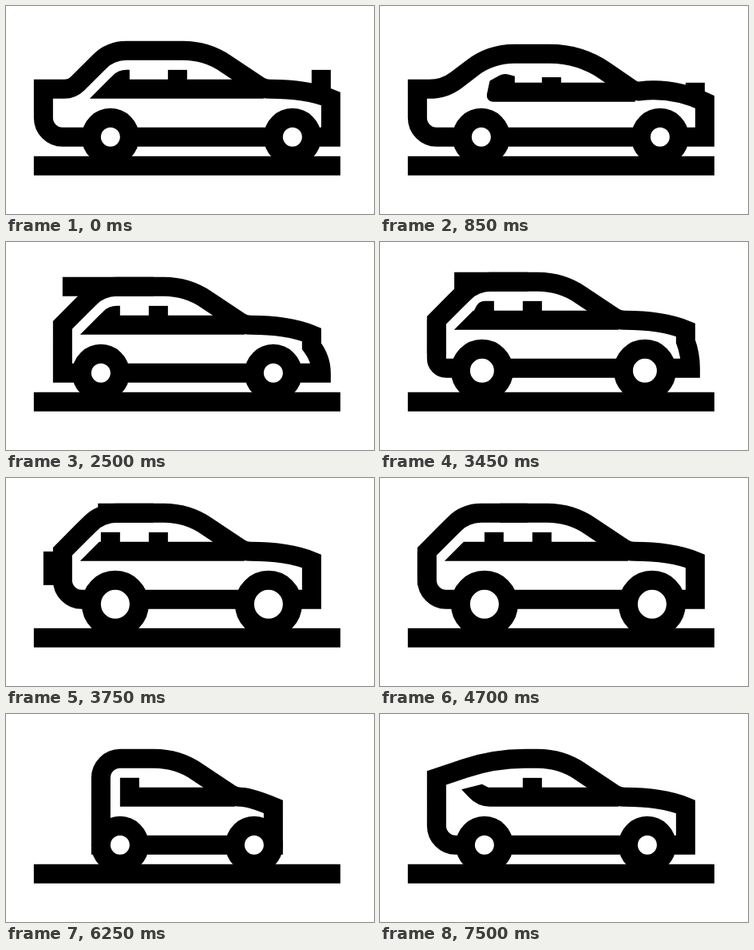
An HTML page with a canvas for the animation above (8000 ms loop, 461 by 260 pixels).

```html
<!DOCTYPE html>
<html lang="en">
<head>
<meta charset="utf-8">
<title>Car shapes</title>
<style>
html, body { margin: 0; width: 100%; height: 100%; overflow: hidden; background: #fff; }
canvas { display: block; width: 100vw; height: 100vh; }
</style>
</head>
<body>
<canvas></canvas>
<script>
const W = 461, H = 260, GRID = 12, LEFT = 34.85, TOP = 43.85;
const HOLD = 750, STEP = 100, STEPS = 6;
const SPAN = HOLD + 500, LOOP = 8000;

const canvas = document.querySelector('canvas');
const ctx = canvas.getContext('2d');
const dpr = window.devicePixelRatio || 1;
canvas.width = W * dpr;
canvas.height = H * dpr;

// Points are in grid cells: [x, y, corner radius].
// A sloping tail at column x, with the belt line cut parallel to it.
function slope(x) {
  const gap = 2 * Math.SQRT2 - 1, edge = [x + gap + 2, 4];
  return {
    low: [x, 10, 2], left: [x, 5], knee: [x + 2, 3, 0], top: [x + 4, 1, 4],
    tip: [x + gap, 6, 0], edge, hip: edge, back: [x + gap + 3, 3, 2], stop: [x + 6, 3]
  };
}

// The common front end, moved along by dx, plus whatever sets a car apart.
function car(dx, ...parts) {
  return Object.assign({
    roof: [16 + dx, 1, 8], join: [22 + dx, 5, 2], hood: [26.5 + dx, 5], nose: [29 + dx, 6],
    belt: 5, seat: [12 + dx, 3], spoiler: 12.5,
    lift: 0, spare: 0, ornament: 0, bumper: 0
  }, ...parts);
}

const sedan = car(2, slope(4), {
  low: [1, 10, 2], left: [1, 5], knee: [4, 5, 2], ornament: 3, wheels: [8, 27]
});
const sports = car(2, {
  low: [1, 10, 2], left: [1, 5], knee: [3.5, 5, 10], top: [9.9, 2, 14],
  roof: [18, 2, 15], join: [23.2, 5.8, 0], hood: [26, 4.4], nose: [31, 7],
  belt: 6, tip: [12.6, 7, 2], edge: [10, 4.4], hip: [10, 4.4], back: [12.4, 4, 0], stop: [13.5, 5],
  seat: [14, 5.3], wheels: [7, 25]
});
const hatch = car(0, slope(3), { low: [3, 10, 0], spoiler: 3, bumper: 1, wheels: [7, 25] });
const offroad = car(0, slope(3), {
  hip: [7, 4], back: [7, 3, 0], spoiler: 6.7, lift: 1, spare: 2, wheels: [8.5, 24.5]
});
const wagon = car(2, slope(1), {
  hip: [9, 4], back: [9, 3, 0], stop: [11, 3], lift: 1, wheels: [7.5, 26.5]
});
const city = car(-1, {
  low: [7, 10, 0], left: [7, 5], knee: [7, 3, 0], top: [7, 1, 2], hood: [22.5, 5], nose: [25, 6],
  tip: [9, 6, 0], edge: [9, 4], hip: [9, 4], back: [9, 3, 0], stop: [11, 3],
  seat: [12, 4.3], wheels: [9, 23]
});
const coupe = car(0, {
  low: [3, 10, 2], left: [3, 3], knee: [5, 7 / 3, 0], top: [9, 1, 20],
  tip: [7.3, 6, 3], edge: [5.6, 4.2], hip: [5.6, 4.2], back: [7.75, 3.65, 0], stop: [8.4, 4],
  wheels: [8, 25]
});
const cars = [sedan, sports, hatch, offroad, wagon, city, coupe];

function mix(a, b, p) {
  if (typeof a === 'number') return a + (b - a) * p;
  if (Array.isArray(a)) return a.map((v, i) => mix(v, b[i], p));
  return Object.fromEntries(Object.keys(a).map(k => [k, mix(a[k], b[k], p)]));
}

function turn([x, y, r], [nextX, nextY]) {
  ctx.arcTo(x, y, nextX, nextY, r);
}

function line(x1, y1, x2, y2) {
  ctx.beginPath();
  ctx.moveTo(x1, y1);
  ctx.lineTo(x2, y2);
  ctx.stroke();
}

function drawBody(c) {
  const [noseX, noseY] = c.nose, foot = noseX + c.bumper;
  ctx.beginPath();
  ctx.moveTo(14, 10);
  turn(c.low, c.left);
  ctx.lineTo(...c.left);
  turn(c.knee, c.top);
  turn(c.top, c.roof);
  turn(c.roof, c.join);
  turn(c.join, c.hood);
  ctx.quadraticCurveTo(...c.hood, noseX, noseY);
  ctx.lineTo(noseX, noseY + 1.2);
  ctx.quadraticCurveTo(foot, noseY + 2.5, foot, 10);
  ctx.closePath();
  ctx.stroke();
  line(c.spoiler, c.roof[1], 12.5, c.roof[1]);
  ctx.fillRect(c.low[0] - c.spare, 5, c.spare, 3.5);
  ctx.fillRect(noseX - 2, noseY - c.ornament, 2, c.ornament);
}

function drawBelt(c) {
  const end = c.join[0];
  ctx.beginPath();
  ctx.moveTo(end, c.belt + 1);
  turn(c.tip, c.edge);
  ctx.lineTo(...c.edge);
  ctx.lineTo(...c.hip);
  turn(c.back, c.stop);
  ctx.lineTo(...c.stop);
  ctx.lineTo(c.stop[0], c.belt - 1);
  ctx.lineTo(end, c.belt - 1);
  ctx.fill();
  ctx.fillRect(...c.seat, 2, 1.5);
}

function drawWheel(x, lift) {
  ctx.beginPath();
  ctx.arc(x, 10 - lift / 2, 2 + lift / 2, 0, 2 * Math.PI);
  ctx.fillStyle = '#fff';
  ctx.fill();
  ctx.stroke();
}

function draw(c) {
  ctx.setTransform(dpr, 0, 0, dpr, 0, 0);
  ctx.fillStyle = '#fff';
  ctx.fillRect(0, 0, W, H);
  ctx.translate(LEFT, TOP);
  ctx.scale(GRID, GRID);
  ctx.lineWidth = 2;
  ctx.fillStyle = ctx.strokeStyle = '#000';
  ctx.save();
  ctx.translate(0, -c.lift);
  drawBody(c);
  drawBelt(c);
  ctx.restore();
  c.wheels.forEach(x => drawWheel(x, c.lift));
  line(0, 13, 32, 13);
}

// Each car holds, then turns into the next in even jumps.
function poseAt(t) {
  const i = Math.floor(t / SPAN), moving = t % SPAN - HOLD;
  if (moving < 0) return cars[i];
  return mix(cars[i], cars[i + 1], (Math.floor(moving / STEP) + 1) / STEPS);
}

const start = performance.now();
function frame() {
  draw(poseAt((performance.now() - start) % LOOP));
  requestAnimationFrame(frame);
}
frame();
</script>
</body>
</html>
```
